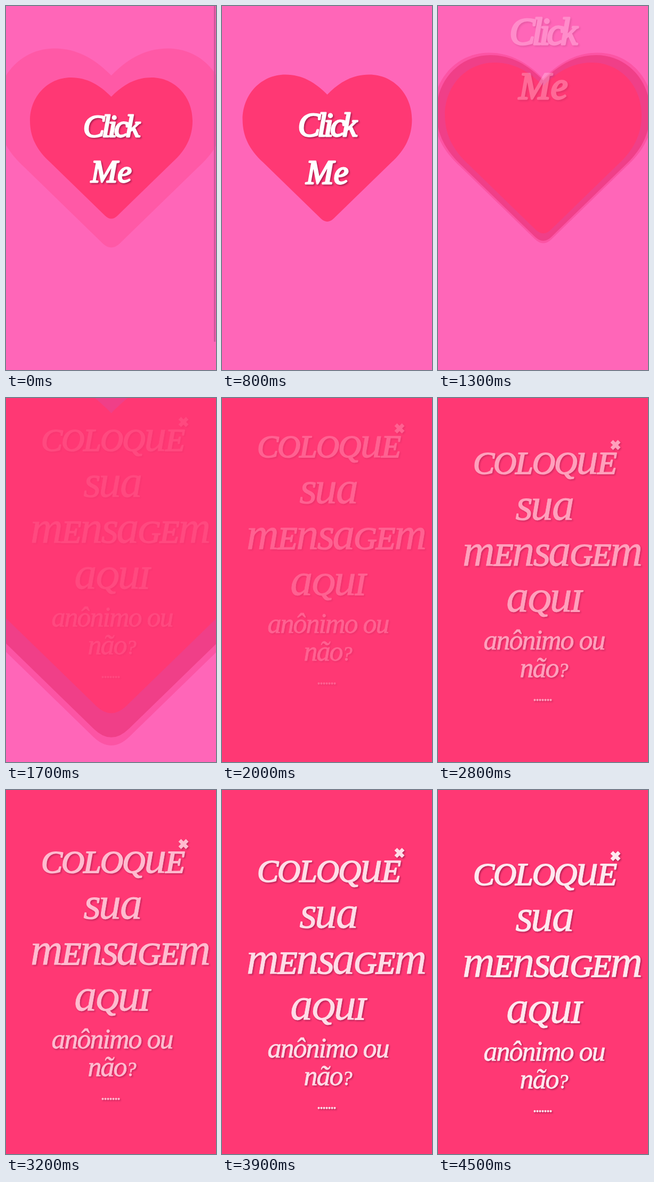
Animation of 394 by 682 pixels, one loop 4.6 s. Source, as an HTML page:

```html
<!DOCTYPE html>
<html lang="pt">
<meta charset="utf-8">
<title>Click Me</title>
<style>
  html, body { margin: 0; width: 100%; height: 100%; overflow: hidden; background: #ff66b8; }
  svg { display: block; }
  text {
    font: italic 60px "Liberation Serif", "Noto Serif", serif;
    text-anchor: middle;
    fill: #fff;
    stroke: #fff;
    stroke-width: 2px;
    stroke-linejoin: round;
  }
  #label, #message { filter: drop-shadow(2px 2px 1.5px rgba(70, 0, 40, .45)); }
  #label text { stroke-width: 2.8px; }
  .caps { letter-spacing: -2px; }
  .round { font-size: 84px; stroke-width: .8px; }
  .small { font-size: 52px; letter-spacing: -2px; stroke-width: .8px; }
  .dots { font-size: 20px; stroke-width: 1.6px; }
</style>
<svg width="394" height="682" viewBox="0 0 394 682">
  <defs>
    <path id="heart" transform="translate(-197.5 -267)" d="M197.5 170C176 148 152 134 122 134C78 134 45 170 45 215C45 248 60 272 82 292L186 393Q197.5 404 209 393L313 292C335 272 350 248 350 215C350 170 317 134 273 134C243 134 219 148 197.5 170Z"/>
  </defs>
  <use id="ping" href="#heart" fill="#ff3874"/>
  <use id="halo" href="#heart" fill="#fc54a4"/>
  <use id="rim" href="#heart" fill="#f03f88"/>
  <use id="core" href="#heart" fill="#ff3874"/>
  <rect id="bar" x="390" width="3" height="629" fill="#cf559c"/>
  <g id="label">
    <text x="-2" y="-22" letter-spacing="-5">Click</text>
    <text y="63">Me</text>
  </g>
  <g id="message">
    <path d="M326 118l14 14m0-14l-14 14" stroke="#fff" stroke-width="7"/>
    <text x="200" y="179" class="caps">COLOQUE</text>
    <text x="200" y="265" class="caps">SUA</text>
    <text x="214" y="351" class="caps">MENSAGEM</text>
    <text x="198" y="437" class="caps">AQUI</text>
    <text x="199" y="508" class="small">anônimo ou</text>
    <text x="198" y="560" class="small">não<tspan font-size="38">?</tspan></text>
    <text x="197" y="604" class="dots">.......</text>
  </g>
</svg>
<script>
const LOOP = 4600, STEP = 100;
const el = id => document.getElementById(id);

// Unicase lettering: some capitals take an enlarged round form
for (const line of document.querySelectorAll(".caps"))
  line.innerHTML = line.textContent.replace(/[AMNU]/g,
    c => `<tspan class="round">${c.toLowerCase()}</tspan>`);

// Linear interpolation through [time, value] points, held at both ends
function track(points, t) {
  if (t <= points[0][0]) return points[0][1];
  for (let i = 1; i < points.length; i++) {
    const [t0, v0] = points[i - 1], [t1, v1] = points[i];
    if (t <= t1) return v0 + (v1 - v0) * (t - t0) / (t1 - t0);
  }
  return points[points.length - 1][1];
}

const growth = [[700, 1], [1200, 1.21], [1300, 1.21], [1400, 1.35], [1500, 1.67],
  [1600, 2.06], [1700, 2.46], [1800, 2.92], [2000, 4.6]];
const lift = [[1100, 0], [1200, -60], [1300, -169], [1400, -270]];
const fade = [[1100, 1], [1200, .7], [1300, .25], [1400, 0]];

function place(id, scale, opacity, dy = 0) {
  el(id).setAttribute("transform", `translate(197.5 ${267 + dy}) scale(${scale})`);
  el(id).style.opacity = opacity;
}

function draw(t) {
  const bursting = t >= 1300 ? 1 : 0;
  place("ping", 1.41 + t * .0009, Math.max(0, .26 * (1 - t / 600)));
  place("halo", track(growth, t + 100), bursting);
  place("rim", track(growth, t + 75), bursting);
  place("core", track(growth, t), 1);
  place("label", Math.min(1.2, track(growth, t)), track(fade, t), track(lift, t));
  el("bar").style.opacity = Math.max(0, 1 - t / 500);

  // The message sinks into place on a sine ease, fading in with its travel
  const drop = 67 * (Math.sin((t - 2000) * .0006) - 1) - 1;
  el("message").setAttribute("transform", `translate(0 ${drop})`);
  el("message").style.opacity = Math.max(0, .9 + drop / 98);
}

const start = performance.now();
function tick() {
  const t = (performance.now() - start) % LOOP;
  draw(Math.floor(t / STEP) * STEP);
  requestAnimationFrame(tick);
}
tick();
</script>
</html>
```
